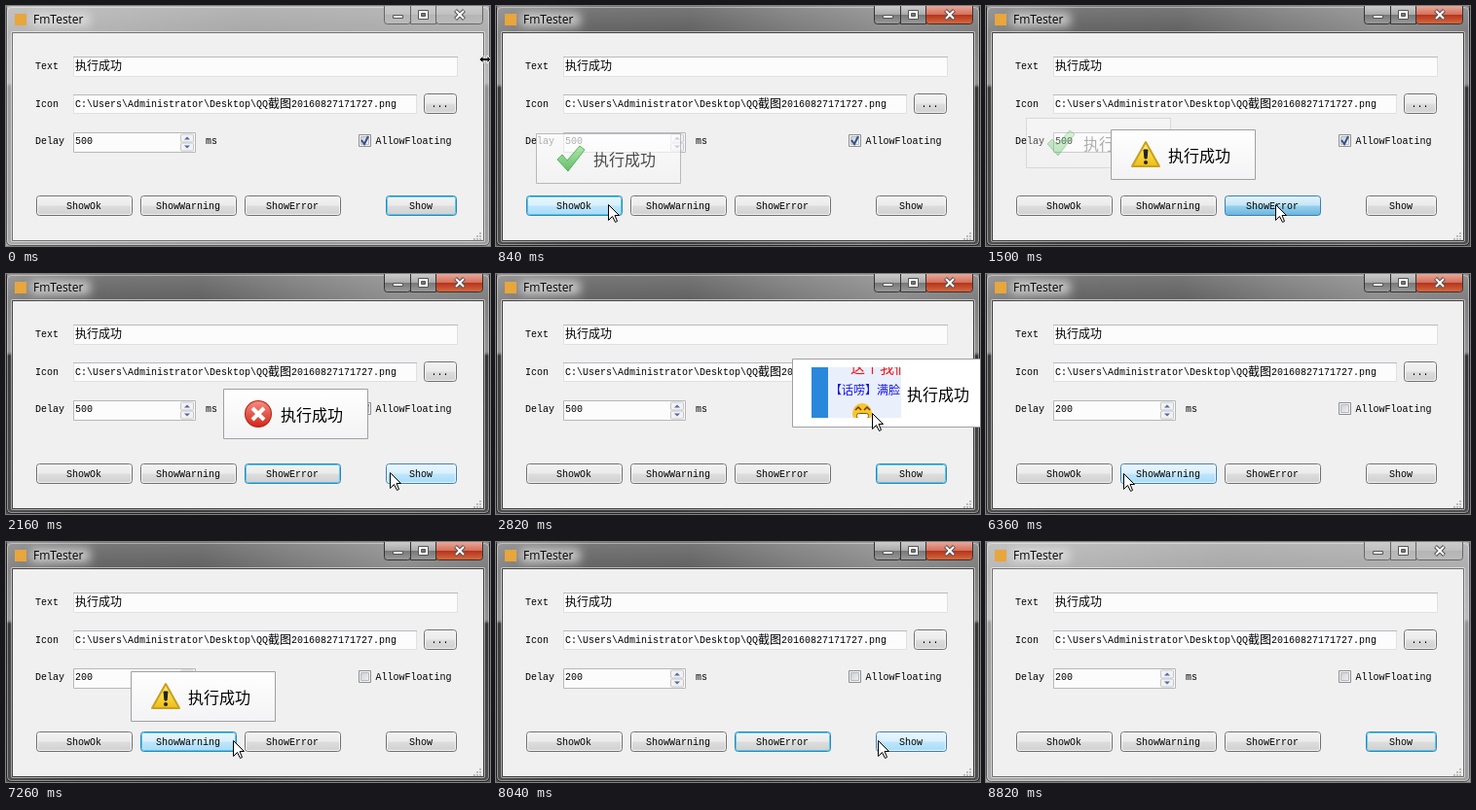
Write an HTML page with a canvas that moves like this. It is 497 px wide and 247 px high and loops after 8.88 s.

```html
<!DOCTYPE html>
<html lang="zh">
<head>
<meta charset="utf-8">
<title>FmTester</title>
<style>
html, body { margin: 0; width: 497px; height: 247px; overflow: hidden; }
canvas { display: block; }
</style>
</head>
<body>
<canvas id="stage" width="497" height="247"></canvas>
<script>
const c = document.getElementById('stage').getContext('2d');
const LOOP = 8880, STEP = 60, FADE = 130, PRESS = 90;
const ACTIVATE = 690, UNCHECK = 3360, SELECT = 3900, HIDE = 4560, TYPED = 5160, LEAVE = 8700;
const MONO = '"Liberation Mono", monospace';
const CJK = '"Noto Sans CJK SC", "Noto Sans CJK", sans-serif';
const MESSAGE = '执行成功';

// tip: where the pointer rests on the button
const buttons = {
  ok: { x: 31, y: 195, w: 99, label: 'ShowOk', tip: 115 },
  warn: { x: 138, y: 195, w: 99, label: 'ShowWarning', tip: 202 },
  error: { x: 245, y: 195, w: 99, label: 'ShowError', tip: 297 },
  show: { x: 390, y: 195, w: 73, label: 'Show', tip: 401 },
  browse: { x: 429, y: 90, w: 34, label: '...' }
};

// Button releases; each one opens a popup
const order = ['ok', 'warn', 'error', 'show'];
const clicks = [780, 1270, 1560, 2380, 6600, 7100, 7540, 8260]
  .map((at, i) => ({ at, id: order[i % 4] }));

// Other pointer stops: arrival, departure, x, y
const stops = [
  [0, 0, 492, 55], [2820, 2820, 386, 143], [UNCHECK - 120, 3660, 367, 138],
  [SELECT, 4040, 90, 140], [4320, 5280, 2, 140], [5900, 5900, 350, 211], [LEAVE, LOOP, 502, 110],
  ...clicks.map(k => [k.at - 120, k.at + 60, buttons[k.id].tip, 204])
].sort((a, b) => a[0] - b[0]);

function pointer(t) {
  const i = stops.findLastIndex(s => s[0] <= t);
  const [, leave, x, y] = stops[i], [arrive, , x2, y2] = stops[i + 1] || [LOOP + 1, 0, x, y];
  const k = Math.max(0, (t - leave) / (arrive - leave)), e = k * k * (3 - 2 * k);
  return { x: Math.round(x + (x2 - x) * e), y: Math.round(y + (y2 - y) * e) };
}

const inside = (p, x, y, w, h) => p.x >= x && p.x < x + w && p.y >= y && p.y < y + h;

function rect(x, y, w, h, fill) {
  c.fillStyle = fill;
  c.fillRect(x, y, w, h);
}

function frame(x, y, w, h, fill, stroke, r = 0) {
  c.beginPath();
  c.roundRect(x + .5, y + .5, w - 1, h - 1, r);
  if (fill) { c.fillStyle = fill; c.fill(); }
  c.strokeStyle = stroke;
  c.lineWidth = 1;
  c.stroke();
}

function gradient(x0, y0, x1, y1, ...stops) {
  const g = c.createLinearGradient(x0, y0, x1, y1);
  stops.forEach((s, i) => Array.isArray(s) ? g.addColorStop(...s) : g.addColorStop(i / (stops.length - 1), s));
  return g;
}

const glossy = (y, h, [a, b, d, e]) => gradient(0, y, 0, y + h, [0, a], [.49, b], [.51, d], [1, e]);

function shape(points, fill, stroke, width = 1) {
  c.beginPath();
  points.forEach(p => c.lineTo(...p));
  c.closePath();
  if (fill) { c.fillStyle = fill; c.fill(); }
  if (stroke) { c.strokeStyle = stroke; c.lineWidth = width; c.stroke(); }
}

function disc(x, y, r, fill) {
  c.beginPath();
  c.arc(x, y, r, 0, 7);
  c.fillStyle = fill;
  c.fill();
}

function line(points, color, width) {
  c.beginPath();
  points.forEach(p => c.lineTo(...p));
  c.strokeStyle = color;
  c.lineWidth = width;
  c.stroke();
}

function cross(x, y, r, color, width) {
  for (const d of [-r, r]) line([[x - r, y - d], [x + r, y + d]], color, width);
}

function text(s, x, y, font = '10px ' + MONO, color = '#000', align = 'left') {
  c.font = font;
  c.fillStyle = color;
  c.textAlign = align;
  c.fillText(s, x, y);
}

function drawWindow(active) {
  const glass = active
    ? gradient(0, 0, 497, 50, '#808080', '#585858', '#565656', '#707070', '#858585', '#747474')
    : gradient(0, 0, 497, 0, '#b4b4b4', '#a2a2a2', '#a8a8a8');
  rect(0, 0, 497, 247, glass);
  rect(0, 0, 497, 247, gradient(0, 0, 0, 247, [0, '#fff3'], [.11, '#fff1'], [.32, '#fff3'],
    [.34, active ? '#0008' : '#0002'], [1, active ? '#0005' : '#0001']));
  frame(0, -4, 497, 251, null, active ? '#222' : '#555', 5);
  frame(1, 1, 495, 245, null, '#fff6', 4);
  frame(5, 26, 487, 217, null, '#fff8', 1);
  frame(6, 27, 485, 215, '#f0f0f0', active ? '#404040' : '#707070');
  c.save();
  c.filter = 'blur(5px)';
  rect(26, 7, 60, 14, active ? '#fff9' : '#fff7');
  c.restore();
  rect(9, 8, 12, 12, '#e8a63c');
  text('FmTester', 28, 18, '12px "Open Sans", sans-serif');

  const edge = active ? '#333' : '#666';
  const pale = active ? ['#ccc', '#aaa', '#777', '#999'] : ['#ccc', '#c0c0c0', '#b5b5b5', '#bbb'];
  const red = active ? ['#e8a899', '#d4705c', '#b5331c', '#d5683e'] : pale;
  frame(388, -4, 28, 23, glossy(0, 18, pale), edge, 3);
  frame(415, -4, 27, 23, glossy(0, 18, pale), edge);
  frame(441, -4, 49, 23, glossy(0, 18, red), edge, 3);
  frame(397, 9, 11, 4, '#fff', '#555');
  frame(423, 4, 11, 10, '#fff', '#555');
  frame(426, 7, 5, 4, '#777', '#555');
  cross(466, 9, 4.5, '#555', 4);
  cross(466, 9, 4, '#fff', 2);
  for (let i = 0; i < 3; i++)
    for (let j = 0; j <= i; j++) rect(486 - 3 * j, 233 + 3 * i, 2, 2, '#bbb');
}

function drawButton(b, state, focused) {
  const styles = {
    normal: ['#707070', '#f3f3f3', '#ebebeb', '#dddddd', '#cfcfcf'],
    hot: ['#3c7fb1', '#eaf6fd', '#d9f0fc', '#bee6fd', '#a7d9f5'],
    down: ['#2c628b', '#e5f4fc', '#c4e5f6', '#98d1ef', '#68b3db']
  };
  const [edge, ...fill] = styles[state];
  frame(b.x, b.y, b.w, 21, glossy(b.y, 21, fill), focused ? '#3c7fb1' : edge, 3);
  if (state != 'down') frame(b.x + 1, b.y + 1, b.w - 2, 19, null, focused ? '#48d0f5' : '#fffb', 2);
  text(b.label, b.x + b.w / 2 - .5, b.y + 14, undefined, '#000', 'center');
}

function drawField(x, y, w, h) {
  frame(x, y, w, h, '#fcfcfc', '#dfe1e4');
  rect(x, y, w, 1, '#b8babf');
}

function drawForm(t, p) {
  const last = clicks.findLast(k => k.at - PRESS <= t);
  const focus = !last ? 'show' : t >= UNCHECK && last.at < UNCHECK ? 'none' : last.id;

  text('Text', 30, 65);
  text('Icon', 30, 104);
  text('Delay', 30, 142);
  text('ms', 205, 142);
  drawField(69, 52, 395, 21);
  text(MESSAGE, 71, 66, '12px ' + CJK);
  drawField(69, 91, 353, 20);
  text('C:\\Users\\Administrator\\Desktop\\QQ', 71, 104);
  text('截图', 269, 105, '12px ' + CJK);
  text('20160827171727.png', 293, 104);

  frame(69, 130, 126, 21, '#fcfcfc', '#b5b7bc');
  const selected = t >= SELECT + 180 && t < TYPED;
  if (selected) rect(71, 132, Math.min(19, Math.max(0, 90 - p.x)), 13, '#3399ff');
  text(t < TYPED ? '500' : '200', 71, 142, undefined, selected ? '#fff' : '#000');
  if (t >= 4800 && t < TYPED) rect(71, 132, 1, 12, '#000');
  for (const d of [-1, 1]) {
    const m = 140.5 + 4.5 * d;
    frame(179, m - 4.5, 14, 9, '#f2f2f2', '#c6c6c6', 1);
    shape([[183, m - d * 1.5], [189, m - d * 1.5], [186, m + d * 1.5]], '#5068b0');
  }

  const hot = inside(p, 362, 132, 98, 14);
  frame(362, 132, 13, 13, '#f4f4f4', hot ? '#3c7fb1' : '#8e8f8f');
  frame(364, 134, 9, 9, gradient(364, 134, 373, 143, '#c8ccd2', '#f4f4f4'), hot ? '#9bc8e8' : '#b5bac0');
  if (t < UNCHECK) line([[365, 138], [368, 142], [372, 134]], '#32508e', 2);
  text('AllowFloating', 379.5, 142);

  for (const id in buttons) {
    const b = buttons[id];
    const down = clicks.some(k => k.id == id && t >= k.at - PRESS && t < k.at);
    const state = down ? 'down' : inside(p, b.x, b.y, b.w, 21) ? 'hot' : 'normal';
    drawButton(b, state, id == focus);
  }
}

// Icons are centred on 0,0
const icons = {
  ok() {
    shape([[-14, 1], [-9, -4], [-4, 2], [9, -13], [14, -9], [-3, 13]],
      gradient(0, -13, 0, 13, '#8fe08a', '#27a52d'), '#2c9a32');
  },
  warn() {
    c.lineJoin = 'round';
    shape([[0, -13], [14, 12], [-14, 12]], gradient(0, -13, 0, 12, '#fff27a', '#f0bd13'), '#c9a01c', 2);
    c.lineJoin = 'miter';
    shape([[-2, -5], [2, -5], [1, 4], [-1, 4]], '#222', '#222');
    disc(0, 8, 2, '#222');
  },
  error() {
    disc(0, 0, 14, '#b32218');
    disc(0, 0, 13, gradient(0, -13, 0, 13, '#f58a7c', '#d2281c'));
    cross(0, 0, 6, '#fff', 4);
  }
};

function drawPicture() {
  c.beginPath();
  c.rect(20, 9, 92, 52);
  c.clip();
  rect(20, 9, 17, 52, '#2a88dc');
  rect(37, 9, 75, 52, '#e9effb');
  text('这个我们', 60, 15, '15px ' + CJK, '#f01818');
  text('【话唠】满脸', 39, 37, '12px ' + CJK, '#1414e8');
  disc(72, 56, 10, '#f8c52c');
  for (const x of [68, 77]) line([[x - 3, 53], [x, 50], [x + 3, 53]], '#6b3b10', 1.5);
  frame(66, 56, 13, 6, '#fff', '#8a5215', 2);
}

function drawPopup({ at, id }, t) {
  const floating = at < UNCHECK;
  const age = t - at, life = (floating ? 500 : 200) + 2 * FADE;
  if (age < 0 || age >= life) return;
  const big = id == 'show', w = big ? 194 : 149, h = big ? 71 : 52;
  const rise = floating ? Math.round(age / 40) : 0;
  c.save();
  c.globalAlpha = Math.min(1, (age + 30) / FADE, (life - age) / FADE);
  c.translate(Math.ceil(buttons[id].tip - w / 2), (big ? 98 : 133) - rise);
  frame(0, 0, w, h, gradient(0, 0, 0, h, '#fff', big ? '#fff' : '#f3f3f5'), '#a0a0a3');
  text(MESSAGE, w - 76 - (big ? 0 : 14), h / 2 + 7, '16px ' + CJK);
  if (big) drawPicture();
  else {
    c.translate(36, 26);
    icons[id]();
  }
  c.restore();
}

function drawPointer(t, p) {
  if (t >= HIDE && t < TYPED || t >= LEAVE) return;
  c.save();
  c.translate(p.x, p.y);
  if (t < STEP || t >= 4260 && t < 5340) {
    for (const d of [-1, 1]) shape([[6 * d, 0], [2 * d, -4], [2 * d, 4]], '#000', '#fff');
    rect(-4, -1, 8, 2, '#000');
  } else if (inside(p, 69, 130, 110, 21) || t > SELECT && t < 4260) {
    rect(0, -7, 1, 15, '#000');
    for (const y of [-8, 8]) rect(-3, y, 7, 1, '#000');
  } else {
    c.translate(.5, .5);
    shape([[0, 0], [0, 16], [4, 12], [7, 18], [9, 17], [6.5, 11], [11, 11]], '#fff', '#000');
  }
  c.restore();
}

function draw(now) {
  const t = Math.floor(now % LOOP / STEP) * STEP;
  const p = pointer(t);
  drawWindow(t >= ACTIVATE && t < LEAVE);
  drawForm(t, p);
  clicks.forEach(k => drawPopup(k, t));
  drawPointer(t, p);
}

let start;
function tick(now) {
  start ??= now;
  draw(now - start);
  requestAnimationFrame(tick);
}
draw(0);
requestAnimationFrame(tick);
</script>
</body>
</html>
```
